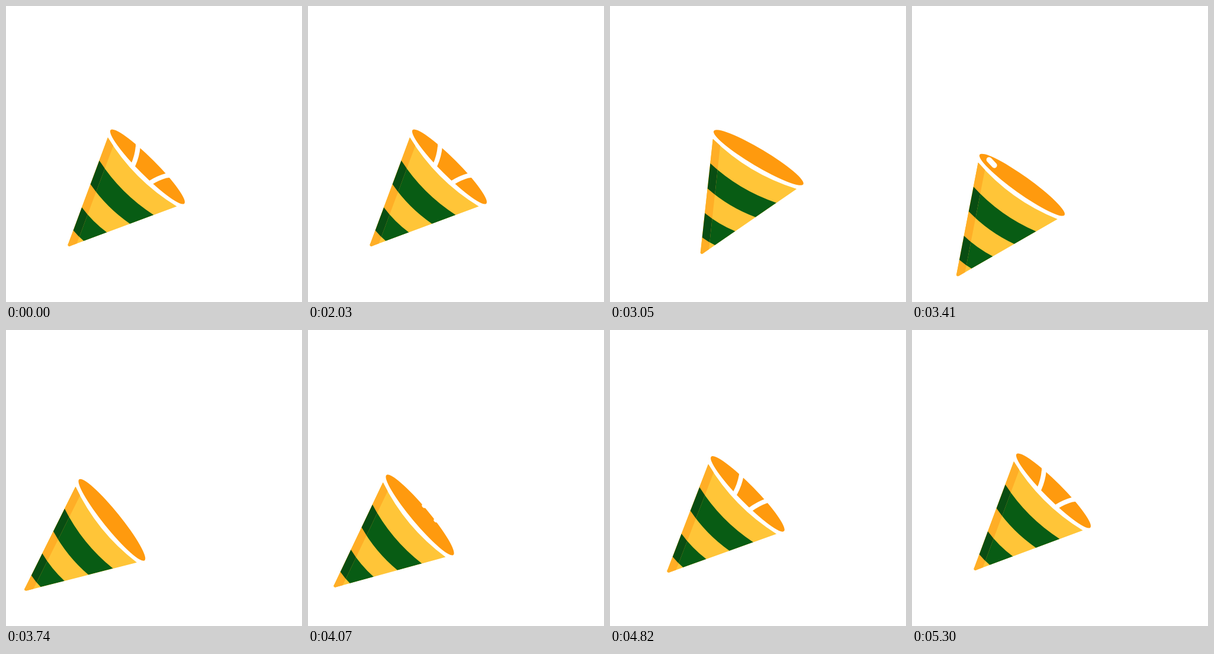
Animation of 500 by 500 pixels, one loop 5360 ms. Source, as an HTML page:

```html
<!DOCTYPE html>
<html lang="en">
<head>
<meta charset="utf-8">
<title>Party popper</title>
<style>
  html, body { margin: 0; width: 100%; height: 100%; overflow: hidden; background: #fff; }
  svg { display: block; width: 100vw; height: 100vh; }
  .paper { fill: none; stroke: #fff; stroke-linecap: round; }
</style>
</head>
<body>
<svg viewBox="0 0 500 500">
  <defs>
    <clipPath id="body"><path id="outline"/></clipPath>
    <clipPath id="edge"><path d="M160 222H186.5L115.8 411.5H90Z"/></clipPath>
  </defs>
  <g class="pose">
    <ellipse cx="239" cy="271.5" rx="88" ry="14.5" transform="rotate(45 239 271.5)" fill="#ff9a0e"/>
  </g>
  <g id="ribbons" class="paper" stroke-width="8" stroke-dasharray="1 2">
    <path pathLength="1" d="M196.5 296.5Q220 270 223 237C226 190 200 120 120 120"/>
    <path pathLength="1" d="M216.5 321Q243 294 271 286.5C320 278 366 300 366 335"/>
  </g>
  <path id="confetto" class="paper" stroke-width="9" d="M130.5 260L139.5 269.5"/>
  <g class="pose">
    <g clip-path="url(#body)">
      <rect x="90" y="200" width="220" height="220" fill="#ffc538"/>
      <path class="stripes" fill="#085c14"/>
      <g clip-path="url(#edge)">
        <rect x="90" y="200" width="220" height="220" fill="#ffae26"/>
        <path class="stripes" fill="#094d12"/>
      </g>
    </g>
  </g>
</svg>
<script>
const LOOP = 5360;
const $ = id => document.getElementById(id);
const all = sel => [...document.querySelectorAll(sel)];

// Curved cross-cut of the cone, from a point on its left side to the mirrored one.
// Narrower cuts are flatter.
function cut(x, y) {
  const w = 510.5 - x - y, bend = 0.0113 * w ** 1.5;
  return {
    from: [x, y],
    ctrl: [x + w / 2 - bend, y + w / 2 + bend],
    to: [x + w, y + w]
  };
}
function band(a, b) {
  return `M${a.from}Q${a.ctrl} ${a.to}L${b.to}Q${b.ctrl} ${b.from}Z`;
}
const rim = cut(172, 222);
$('outline').setAttribute('d',
  `M${rim.from}Q${rim.ctrl} ${rim.to}L109.5 405.1C106 407.5 103 404.5 105.4 401Z`);
const stripes = band(cut(157.6, 261), cut(142.6, 301)) + band(cut(128, 340), cut(113.6, 379));
all('.stripes').forEach(p => p.setAttribute('d', stripes));

// time, mouth centre x, y, tilt, at rest
const keys = [
  [2040, 239, 271.5, 0, true],
  [3110, 251, 255.9, -14.3, true],
  [3410, 186, 302, -9.5, false],
  [3620, 178.2, 323, 1, false],
  [3700, 178.7, 320.9, 6.1, true],
  [5110, 239, 271.5, 0, true]
];

// Monotone cubic through the keys.
const rate = (i, c) => (keys[i + 1][c] - keys[i][c]) / (keys[i + 1][0] - keys[i][0]);
function slope(i, c) {
  if (keys[i][4]) return 0;
  const a = rate(i - 1, c), b = rate(i, c);
  return a * b > 0 ? 2 * a * b / (a + b) : 0;
}
function value(t, c) {
  const last = keys.length - 1;
  if (t <= keys[0][0] || t >= keys[last][0]) return keys[0][c];
  let i = 0;
  while (t > keys[i + 1][0]) i++;
  const p = keys[i], q = keys[i + 1], d = q[0] - p[0];
  const u = (t - p[0]) / d, v = 1 - u;
  return p[c] * v * v * (1 + 2 * u) + q[c] * u * u * (3 - 2 * u)
    + d * u * v * (slope(i, c) * v - slope(i + 1, c) * u);
}

const clamp = u => Math.min(1, Math.max(0, u));
const poses = all('.pose');

function draw(t) {
  const move = `translate(${value(t, 1)} ${value(t, 2)}) rotate(${value(t, 3)}) translate(-239 -271.5)`;
  poses.forEach(g => g.setAttribute('transform', move));

  const burst = t > 3000;
  const grown = burst ? clamp((t - 3450) / 450) : 1;
  const ribbons = $('ribbons');
  ribbons.setAttribute('stroke-dashoffset', 1 - grown);
  ribbons.setAttribute('opacity', burst ? +(grown > 0) : 1 - clamp((t - 2040) / 360));

  const flight = (3410 - t) * 0.35;
  $('confetto').setAttribute('transform', `translate(${flight} ${flight * 1.05})`);
  $('confetto').setAttribute('opacity', +(t > 3320 && t < 3600));
}

const start = performance.now();
function tick() {
  draw((performance.now() - start) % LOOP);
  requestAnimationFrame(tick);
}
tick();
</script>
</body>
</html>
```
